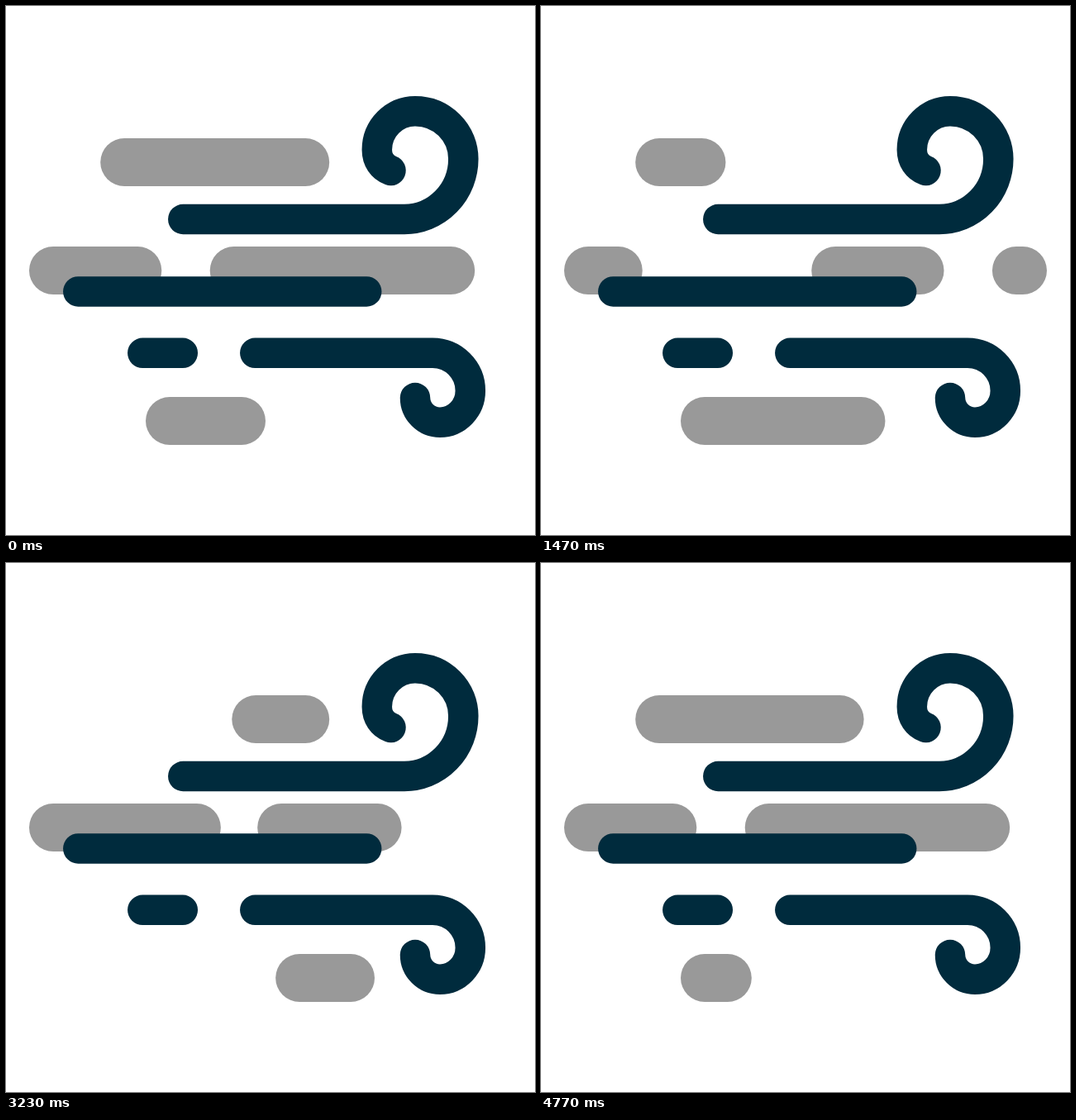
Animation of 640 by 640 pixels, one loop 4.81 s. Source, as an HTML page with a canvas:

```html
<!DOCTYPE html>
<html lang="en">
<head>
<meta charset="utf-8">
<title>Wind</title>
<style>
html, body { margin: 0; width: 100%; height: 100%; overflow: hidden; background: #fff; }
canvas { display: block; width: 640px; height: 640px; }
</style>
</head>
<body>
<canvas id="stage" width="640" height="640"></canvas>
<script>
const ctx = document.getElementById('stage').getContext('2d');
const LOOP = 4810;
const LAST_STEP = 119;
const SPEED = 962.4 / LAST_STEP; // px per step

// Dashed streaks that flow to the right inside fixed ends
const streaks = [
  { y: 189, from: 143.2, to: 362.2, dash: [248, 248], start: 0, rate: 1 },
  { y: 320, from: 57, to: 583, dash: [102.3, 116.4, 262.5], start: 0, rate: 1 },
  { y: 502, from: 198, to: 417, dash: [248, 248], start: 161, rate: 2 }
];

const gusts = new Path2D(
  'M214.3 258H482A71.3 73 0 0 0 553.3 185A58.3 57.8 0 0 0 495 127.2' +
  'A46.2 46.8 0 0 0 448.8 174C448.8 186 455 195 465.5 199' +
  'M87.3 345.4H436.2' +
  'M165.3 419.8H213.8' +
  'M301.3 419.8H516A45.8 45.8 0 0 1 561.8 465.6A36.8 38.1 0 0 1 525 503.7' +
  'A30 29.7 0 0 1 495 474'
);

// 25 poses a second, shown on a 30 Hz clock with 10 ms timing
function stepAt(ms) {
  const tick = Math.floor((Math.floor(ms / 10) * 10 + 3.4) * 0.03);
  return Math.min(LAST_STEP, Math.ceil((tick * 5 - 3) / 6));
}

function drawStreak({ y, from, to, dash, start, rate }, step) {
  ctx.setLineDash(dash);
  ctx.lineDashOffset = start - step * SPEED * rate;
  ctx.beginPath();
  ctx.moveTo(from, y);
  ctx.lineTo(to, y);
  ctx.stroke();
}

function draw(ms) {
  const step = stepAt(ms);
  ctx.fillStyle = '#fff';
  ctx.fillRect(0, 0, 640, 640);
  ctx.lineCap = ctx.lineJoin = 'round';

  ctx.strokeStyle = '#999';
  ctx.lineWidth = 58;
  streaks.forEach(streak => drawStreak(streak, step));

  ctx.setLineDash([]);
  ctx.strokeStyle = '#002b3d';
  ctx.lineWidth = 36.5;
  ctx.stroke(gusts);
}

const begin = performance.now();
function loop() {
  draw((performance.now() - begin) % LOOP);
  requestAnimationFrame(loop);
}
loop();
</script>
</body>
</html>
```
